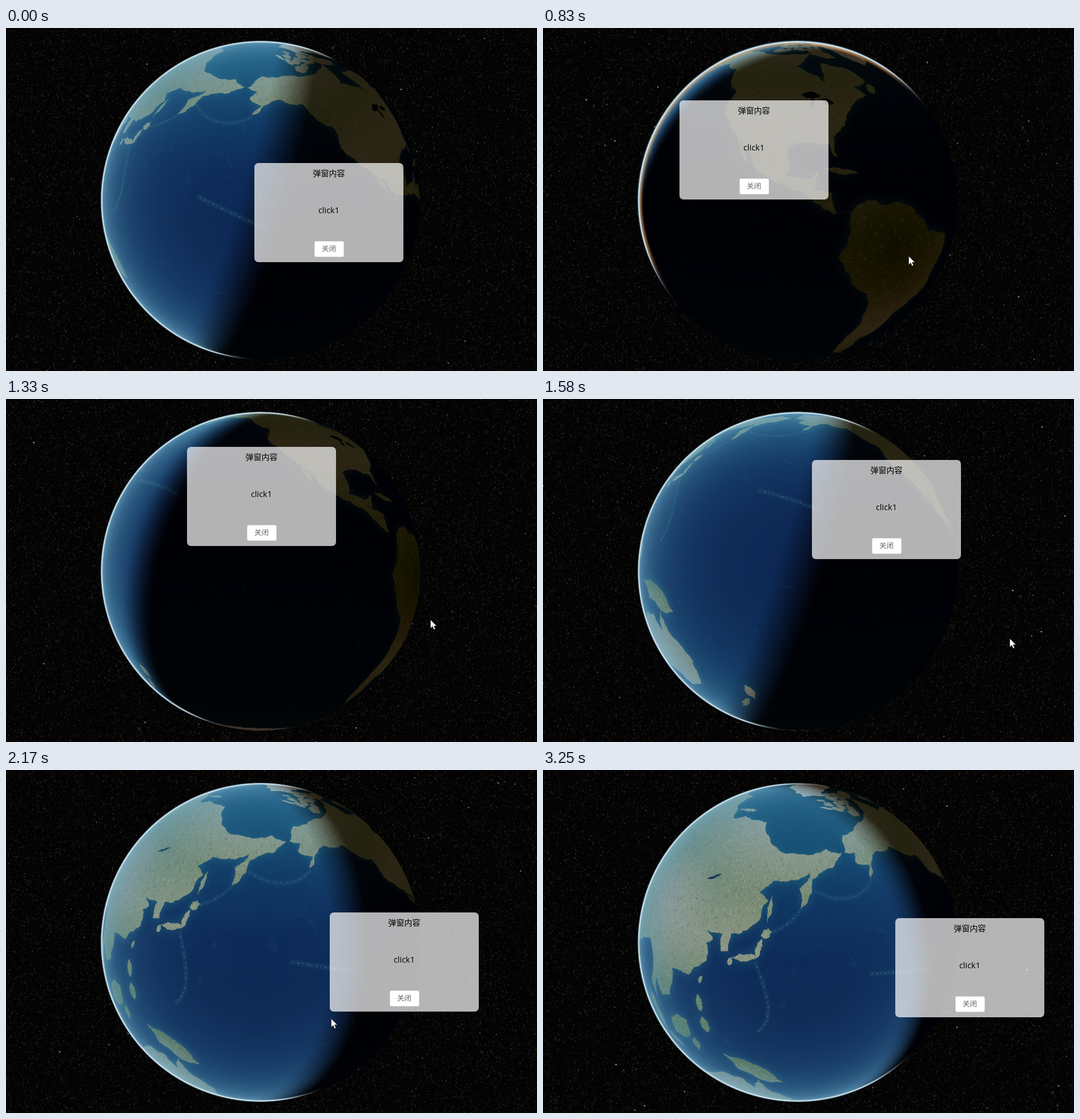
An HTML page with a canvas for the animation above (3.33 s loop, 930 px wide and 602 px high).

```html
<!DOCTYPE html>
<html lang="zh">
<head>
<meta charset="utf-8">
<title>Globe popup</title>
<style>
html, body { margin: 0; width: 100%; height: 100%; overflow: hidden; background: #000; }
#sky, #popup, #cursor { position: absolute; left: 0; top: 0; }
#popup {
  width: 261px; height: 174px; border-radius: 7px; background: rgba(255,255,255,.7);
  font: 14px/20px "Open Sans", "Noto Sans CJK SC", "Noto Sans CJK", sans-serif; color: #000; text-align: center;
}
#popup div { position: absolute; left: 0; width: 100%; }
#popup .title { top: 8px; }
#popup .body { top: 73px; font-size: 14.5px; }
#popup .close {
  left: 104.5px; top: 137px; width: 50px; height: 26px; border: 1px solid #dcdfe6; border-radius: 3px;
  background: #fff; color: #606266; font-size: 12.5px; line-height: 26px;
}
</style>
</head>
<body>
<canvas id="sky" width="930" height="602"></canvas>
<div id="popup">
  <div class="title">弹窗内容</div>
  <div class="body">click1</div>
  <div class="close">关闭</div>
</div>
<svg id="cursor" width="14" height="20"><path d="M.5 .5V15.5L4 12.2L6.4 17.8L8.9 16.7L6.5 11.2H11.3Z" fill="#fff" stroke="#222" stroke-width=".7"/></svg>
<script>
const CX = 446, CY = 302.5, R = 279.5, DIST = 4.7, FOCAL = R * Math.sqrt(DIST * DIST - 1);
const LIMB_Z = 1 / DIST, LIMB_R = Math.sqrt(1 - LIMB_Z * LIMB_Z);
const LOOP = 3330, STEP = 250 / 3, RAD = Math.PI / 180;
const SUN = { lon: 110, lat: 18 }, PIN = { lon: -161.3, lat: 40 };
const TW = 2048, TH = 1024;

// time, view longitude, view latitude, popup left, popup top
const VIEW = [
  [0, -158.4, 29, 435, 237], [580, -107, 36.5, 252.5, 214], [1080, -87, -10, 244, 112],
  [1580, -166, 3.3, 471, 107], [1920, -161.6, 17.3, 450, 169.5], [2330, -204.8, 41, 617, 260]
];
const POINTER = [
  [160, 820, 490], [580, 633, 463], [1080, 656, 352], [1580, 817, 420],
  [1920, 483, 414], [2330, 668, 460], [2660, 940, 520]
];

// Key points (lon, lat) only; roughen() grows the coast between them.
const EURASIA = [190,66,179,62.5,163.5,59,162,55,156.7,51,156,57,163,62,155,59.5,142,59,135.5,54.7,141,52.5,139,47,128.5,40.5,129.3,35.4,126.3,34.5,125,39.5,118,39,122,37,119.5,35,121.8,30,116,23,108,21.5,109,12,105,9,100.5,13.4,103.8,1.4,98,9,97,16.5,91,22.5,80,14,77.5,8,72.7,20,57,26,45,13,35,30,28,41,0,43,-4,48,20,55,12,58,27,71,68,69,72,73,104,77.5,130,71,180,69];
const NORTH_AMERICA = [-168,65.7,-157,71.3,-128,70.2,-95,68.5,-82,69,-94,60,-82.3,55,-79.5,51.5,-77.5,62.4,-65,59.5,-56,52.5,-66,49.5,-61,46,-70,42.5,-76,35.2,-81,31.5,-80.4,25.2,-83,29.5,-97,28,-97,20,-91,18.5,-87,21.4,-88.5,15.9,-83.3,15,-82,9,-77,8.6,-83,8.5,-95,15.8,-105.5,20.3,-113.5,31,-109.7,23,-117.3,33,-124.3,41,-123.5,48.5,-134,58,-146,60.7,-152,60,-163.5,54.8,-158,58.7,-165.5,61.5,-161,64.3];
const SOUTH_AMERICA = [-77.3,8.6,-72,12,-62,10.6,-51,4,-48,-.8,-35.2,-5.5,-39,-14,-41,-22,-48.5,-26,-57.5,-36,-65,-41,-66,-47,-68.4,-52.5,-66,-55,-73.5,-52,-73,-38,-70.3,-18.4,-76.2,-14,-81.3,-4.7,-77.5,4];
const AUSTRALIA = [142.5,-10.7,146,-19,153.5,-27,150,-37.5,143,-39,138,-34,131,-31.5,115.5,-34.5,113.7,-23,130,-12,136.8,-12.2,140.5,-17.5];
const GREENLAND = [-72,78,-40,83.5,-20,80,-22,70,-43.5,60,-53.5,67,-57,76];

// Islands as spindles: from lon, lat to lon, lat, and width in degrees
const ISLANDS = [
  [130.9, 34, 140.5, 35.7, 2], [140, 35, 141.3, 41.3, 2.2], [130.5, 31.2, 131, 33.8, 1.8], [140.5, 42, 145, 43.7, 2.8],
  [142.3, 46, 142.8, 54.3, 1.6], [120.8, 22, 121.4, 25.2, 1.3], [121, 18.5, 123, 13, 2.4], [123.5, 11.5, 125.8, 6, 3],
  [111, -2.5, 117.5, 6.5, 8], [95.4, 5.5, 105.7, -5.8, 4], [105.3, -6.5, 114.5, -8.4, 1.6], [120, 1, 121.5, -5, 2.8],
  [131, -1, 150.5, -10.3, 6.5], [173.5, -35, 176, -41.3, 3.4], [173.7, -41, 167.3, -46.4, 2.6],
  [-84.8, 22, -74.3, 20.2, 1.5], [-62, 65.5, -88, 73.3, 6], [-59, 48, -53.3, 49, 4], [53, 71, 68, 76.8, 2.6]
];
const LAKES = [[-92, 46.8, -83, 46.4, 2.4], [-87, 46, -87.3, 41.7, 1.7], [-84, 45, -78, 43, 2], [104, 51.6, 110, 55.6, .9]];
// Dotted island arcs: start, control point, end
const ARCS = [[-163, 54.6, -178, 48.5, -196, 56], [157, 51, 152, 46, 145, 43.5], [-155, 19.5, -165, 25, -180, 28.5], [140, 34, 150, 20, 143, 12]];

const seeded = seed => () => {
  seed = (seed + 0x6D2B79F5) | 0;
  let v = Math.imul(seed ^ (seed >>> 15), 1 | seed);
  v ^= v + Math.imul(v ^ (v >>> 7), 61 | v);
  return ((v ^ (v >>> 14)) >>> 0) / 4294967296;
};
const clamp = v => v < 0 ? 0 : v > 1 ? 1 : v;
const smooth = (a, b, v) => { v = clamp((v - a) / (b - a)); return v * v * (3 - 2 * v); };
const layer = (w, h) => Object.assign(document.createElement("canvas"), { width: w, height: h }).getContext("2d");
const mapX = lon => (lon + 180) / 360 * TW, mapY = lat => (90 - lat) / 180 * TH;
const coast = seeded(12);

// Midpoint displacement of a closed outline.
function roughen(points, depth = 4) {
  if (!depth) return points;
  const finer = [], n = points.length;
  for (let i = 0; i < n; i += 2) {
    const x = points[i], y = points[i + 1], nx = points[(i + 2) % n], ny = points[(i + 3) % n];
    const shrink = Math.max(.2, Math.cos(y * RAD)), push = (coast() - .5) * .26;
    finer.push(x, y, (x + nx) / 2 - (ny - y) * push / shrink, (y + ny) / 2 + (nx - x) * push * shrink);
  }
  return roughen(finer, depth - 1);
}
function spindle([x, y, ex, ey, width]) {
  const length = Math.hypot(ex - x, ey - y), ox = -(ey - y) / length * width / 2, oy = (ex - x) / length * width / 2;
  const at = (u, side) => [x + (ex - x) * u + ox * side, y + (ey - y) * u + oy * side];
  return roughen([x, y, ...at(.3, 1), ...at(.7, 1), ex, ey, ...at(.7, -1), ...at(.3, -1)], 3);
}
function arcticIslands() {
  return Array.from({ length: 16 }, (_, i) => {
    const lon = -122 + (i % 6) * 9 + coast() * 5, lat = 71.5 + Math.floor(i / 6) * 3.8 + coast() * 1.5;
    return spindle([lon, lat, lon + 9 + coast() * 6, lat + coast() * 2, 2 + coast() * 2]);
  });
}
function antarctica() {
  const rim = [-180, -90];
  for (let lon = -180; lon <= 180; lon += 3)
    rim.push(lon, -72 + 4 * Math.sin((lon - 20) * RAD) + 8 * Math.exp(-(((lon + 63) / 6) ** 2)) + coast() * 1.2);
  return [...rim, 180, -90];
}

function fillShapes(g, shapes, color) {
  g.fillStyle = color;
  g.beginPath();
  for (const shape of shapes) for (const turn of [-360, 0, 360]) {
    for (let i = 0; i < shape.length; i += 2)
      g[i ? "lineTo" : "moveTo"](mapX(shape[i] + turn), mapY(shape[i + 1]));
    g.closePath();
  }
  g.fill();
}
function verticalFade(g, colors) {
  const fade = g.createLinearGradient(0, 0, 0, TH);
  colors.forEach((color, i) => fade.addColorStop(i / (colors.length - 1), color));
  return fade;
}
function blot(g, lon, lat, size, tint) {
  const x = mapX(lon), y = mapY(lat), r = size / 360 * TW, glow = g.createRadialGradient(x, y, 0, x, y, r);
  glow.addColorStop(0, `rgba(${tint},.9)`);
  glow.addColorStop(1, `rgba(${tint},0)`);
  g.fillStyle = glow;
  g.fillRect(x - r, y - r, 2 * r, 2 * r);
}

function makeMap() {
  const land = layer(TW, TH), map = layer(TW, TH), rand = seeded(7);
  const continents = [EURASIA, NORTH_AMERICA, SOUTH_AMERICA, AUSTRALIA].map(shape => roughen(shape));
  for (const shape of [...continents, ...ISLANDS.map(spindle), ...arcticIslands()])
    fillShapes(land, [shape], verticalFade(land, ["#b4b6aa", "#9a9e8c", "#7e8a6c", "#96967c", "#7c8460", "#5c6c42", "#78704e", "#9a8c70", "#7c7a5c", "#888", "#888"]));
  land.globalCompositeOperation = "source-atop";
  blot(land, 92, 36, 24, "172,160,142");
  blot(land, 134, -25, 24, "190,178,166");
  blot(land, -62, -4, 24, "58,68,38");
  for (let i = 0; i < 42000; i++) {
    const pale = rand() < .5;
    land.fillStyle = pale ? "rgba(205,196,178,.24)" : "rgba(55,75,45,.24)";
    land.beginPath();
    land.ellipse(rand() * TW, rand() * TH, .6 + rand() * 4, .5 + rand() * 1.2, rand() * 3, 0, 7);
    land.fill();
  }
  land.globalCompositeOperation = "source-over";
  fillShapes(land, [roughen(GREENLAND), antarctica()], "rgb(200,196,192)");

  map.fillStyle = verticalFade(map, ["#10446a", "#10446a", "#0b2f5c", "#08204e", "#081d4a", "#081d4a", "#08204c", "#08244e", "#0a2850", "#0d3050", "#0d3050"]);
  map.fillRect(0, 0, TW, TH);
  for (let i = 0; i < 500; i++) {
    map.fillStyle = `rgba(35,85,120,${.03 + rand() * .1})`;
    map.beginPath();
    map.ellipse(rand() * TW, rand() * TH, 3 + rand() * 18, 1 + rand() * 4, rand() * 3, 0, 7);
    map.fill();
  }
  for (const [width, color, dash] of [[9, "rgba(30,80,110,.25)", []], [1.6, "rgba(95,135,140,.55)", [2, 5, 4, 7]]]) {
    map.lineWidth = width;
    map.strokeStyle = color;
    map.setLineDash(dash);
    for (const [x, y, cx, cy, ex, ey] of ARCS) for (const turn of [0, 360]) {
      map.beginPath();
      map.moveTo(mapX(x + turn), mapY(y));
      map.quadraticCurveTo(mapX(cx + turn), mapY(cy), mapX(ex + turn), mapY(ey));
      map.stroke();
    }
  }
  map.shadowColor = "rgba(32,95,115,.85)";
  map.shadowBlur = 20;
  map.drawImage(land.canvas, 0, 0);
  map.shadowBlur = 0;
  fillShapes(map, LAKES.map(spindle), "#0a2340");
  return map.getImageData(0, 0, TW, TH).data;
}

function makeStars() {
  const g = layer(1024, 1024), rand = seeded(31);
  g.fillStyle = "#030303";
  g.fillRect(0, 0, 1024, 1024);
  for (let i = 0; i < 60000; i++) {
    const tint = rand() < .6 ? "105,98,60" : "78,76,130";
    g.fillStyle = `rgba(${tint},${.06 + rand() * rand() * .45})`;
    g.fillRect(rand() * 1024, rand() * 1024, 1 + rand(), 1 + rand() * 1.8);
  }
  for (let i = 0; i < 190; i++) {
    g.fillStyle = `rgba(190,195,215,${.2 + rand() * rand() * .75})`;
    g.beginPath();
    g.arc(rand() * 1024, rand() * 1024, .6 + rand() * .9, 0, 7);
    g.fill();
  }
  return g.canvas;
}

// Direction of a place as seen by the camera: x right, y up, z towards it.
function direction(place, lon, lat) {
  const d = (place.lon - lon) * RAD, p = place.lat * RAD, v = lat * RAD;
  const flat = Math.cos(p) * Math.cos(d), up = Math.sin(p);
  return [Math.cos(p) * Math.sin(d), up * Math.cos(v) - flat * Math.sin(v), up * Math.sin(v) + flat * Math.cos(v)];
}
function project(place, lon, lat) {
  const [x, y, z] = direction(place, lon, lat), scale = FOCAL / (DIST - z);
  return [CX + x * scale, CY - y * scale];
}

// Monotone cubic interpolation through rows of [time, ...values].
function sample(rows, t) {
  const last = rows.length - 1;
  if (t <= rows[0][0]) return rows[0].slice(1);
  if (t >= rows[last][0]) return rows[last].slice(1);
  const i = rows.findIndex(row => row[0] > t) - 1;
  const h = rows[i + 1][0] - rows[i][0], u = (t - rows[i][0]) / h;
  const rate = (j, c) => (rows[j + 1][c] - rows[j][c]) / (rows[j + 1][0] - rows[j][0]);
  const slope = (j, c) => {
    if (j === 0) return rate(0, c);
    if (j === last) return 0;
    const a = rate(j - 1, c), b = rate(j, c);
    return a * b > 0 ? 2 * a * b / (a + b) : 0;
  };
  return rows[i].slice(1).map((from, k) => {
    const c = k + 1, to = rows[i + 1][c];
    return from + (to - from) * u * u * (3 - 2 * u)
      + h * u * (1 - u) * ((1 - u) * slope(i, c) - u * slope(i + 1, c));
  });
}

// Popup values become offsets from the projected pin.
const camera = VIEW.map(([t, lon, lat, x, y]) => {
  const [px, py] = project(PIN, lon, lat);
  return [t, lon, lat, x - px, y - py];
});

const SIZE = 568, LEFT = Math.round(CX - SIZE / 2), TOP = Math.floor(CY - SIZE / 2);
const pixels = [];
for (let j = 0; j < SIZE; j++) for (let i = 0; i < SIZE; i++) {
  const dx = LEFT + i + .5 - CX, dy = CY - (TOP + j + .5), r = Math.hypot(dx, dy);
  if (r > R + 3) continue;
  const k = 1 + (r / FOCAL) ** 2, root = Math.sqrt(Math.max(0, DIST * DIST - k * (DIST * DIST - 1)));
  const reach = (DIST - root) / k, mu = clamp(root / Math.sqrt(k));
  pixels.push({
    at: (j * SIZE + i) * 4, x: dx / FOCAL * reach, y: dy / FOCAL * reach, z: DIST - reach,
    ex: dx / r, ey: dy / r, inset: R - r, cover: clamp(R - r + .5),
    haze: .1 + .68 * (1 - mu) ** 1.4, mist: .5 * (1 - mu) ** 4
  });
}

const map = makeMap(), stars = makeStars();
const globe = layer(SIZE, SIZE), image = globe.createImageData(SIZE, SIZE);
const sky = document.getElementById("sky").getContext("2d");
const popup = document.getElementById("popup"), cursor = document.getElementById("cursor");
const AIR = [62, 140, 176], RIM = [208, 232, 242], DUSK = [235, 145, 65], NIGHT = [2, 8, 17];
const bell = (v, width) => Math.exp(-((v / width) ** 2));

function drawGlobe(lon, lat) {
  const sun = direction(SUN, lon, lat), cos = Math.cos(lat * RAD), sin = Math.sin(lat * RAD);
  const backlit = clamp((-sun[2] - .6) * 3), data = image.data;
  for (const p of pixels) {
    const up = p.y * cos + p.z * sin, ahead = p.z * cos - p.y * sin;
    const u = Math.floor((lon / 360 + Math.atan2(p.x, ahead) / (2 * Math.PI) + 2.5) * TW) % TW;
    const v = Math.min(TH - 1, Math.floor((.5 - Math.asin(Math.max(-1, Math.min(1, up))) / Math.PI) * TH));
    const texel = (v * TW + u) * 4;
    const facing = p.x * sun[0] + p.y * sun[1] + p.z * sun[2];
    const day = clamp(facing * 4.5), light = .3 + .7 * day, sunlit = smooth(-.03, .28, facing);
    const air = p.haze * sunlit, mist = p.mist * sunlit;
    let rim = 0, dusk = 0;
    if (p.inset < 14) {
      const lit = smooth(-.2, .06, LIMB_R * (p.ex * sun[0] + p.ey * sun[1]) + LIMB_Z * sun[2]);
      rim = lit * bell(p.inset - 1 - backlit * .5, 1.5 + backlit * lit * .8);
      dusk = lit * lit * backlit * bell(p.inset - 4.5, 2.6);
    }
    for (let c = 0; c < 3; c++) {
      let value = Math.max(0, map[texel + c] * light - NIGHT[c] * (1 - day));
      value += (AIR[c] - value) * air;
      value += (RIM[c] - value) * mist;
      value += (DUSK[c] - value) * dusk;
      data[p.at + c] = value + (RIM[c] - value) * rim;
    }
    data[p.at + 3] = 255 * Math.max(p.cover, rim);
  }
  globe.putImageData(image, 0, 0);
  sky.drawImage(globe.canvas, LEFT, TOP);
}

function drawStars(lon, lat) {
  const wrap = v => ((v % 1024) + 1024) % 1024 - 1024;
  const x = wrap(lon * RAD * FOCAL * .8), y = wrap(-lat * RAD * FOCAL);
  for (const dx of [0, 1024]) for (const dy of [0, 1024])
    sky.drawImage(stars, Math.round(x + dx), Math.round(y + dy));
}

const place = (el, x, y) => { el.style.transform = `translate(${Math.round(x)}px,${Math.round(y)}px)`; };

function render(t) {
  const [lon, lat, ox, oy] = sample(camera, t), [px, py] = project(PIN, lon, lat);
  drawStars(lon, lat);
  drawGlobe(lon, lat);
  place(popup, px + ox, py + oy);
  place(cursor, ...sample(POINTER, t));
  cursor.style.display = t > 160 && t < 2660 ? "block" : "none";
}

let shown = -1;
const start = performance.now();
function tick() {
  const t = (performance.now() - start) % LOOP;
  const step = Math.min(39, Math.floor((t + 5) / STEP));
  if (step !== shown) render((shown = step) * STEP);
  requestAnimationFrame(tick);
}
tick();
</script>
</body>
</html>
```
